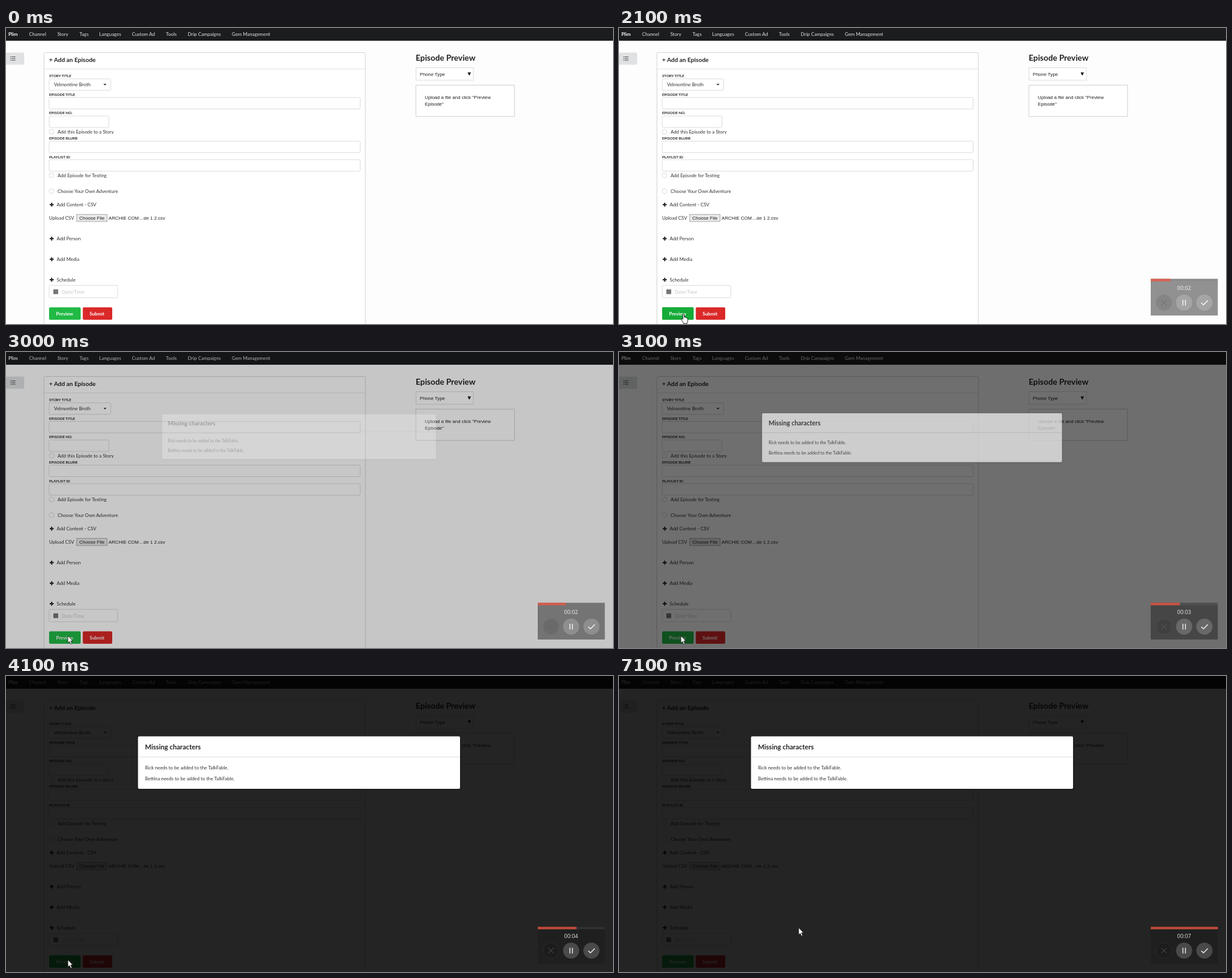
Animation of 1000x488 px, one loop 7.2 s. Source, as an HTML page:

```html
<!DOCTYPE html>
<html lang="en">
<head>
<meta charset="utf-8">
<title>Add an Episode</title>
<style>
  html, body { margin: 0; width: 100%; height: 100%; overflow: hidden; background: #fdfdfd; }
  svg { display: block; width: 100%; height: 100%; }
  text { font: 7.82px Lato, sans-serif; fill: #333; white-space: pre; }
  .arial text { font: 7.8px "Liberation Sans", Arial, sans-serif; fill: #222; }
  .nav text { fill: #e6e6e6; }
  .labels text { font-size: 6.15px; font-weight: 700; fill: #222; }
  .bold, .buttons text { font-weight: 700; }
  .nav .bold, .buttons text { fill: #fff; }
  .h2 { font-size: 13.4px; font-weight: 700; fill: #222; }
  .h3 { font-size: 10px; font-weight: 700; fill: #222; }
  .modal-title { font-size: 11.1px; font-weight: 700; fill: #222; }
  .box { fill: #fff; stroke: #dcdcdd; }
  .clock { font: 9px "Open Sans", sans-serif; fill: #fff; fill-opacity: .88; text-anchor: middle; }

  .hover, .dim, .modal, .recorder, .bar, .arrow, .hand, .move { animation: 7.2s linear infinite; }
  .dim { animation-name: fade; }
  .modal { animation-name: fade, grow; transform-origin: 482.75px 122px; }
  .recorder { animation-name: appear; }
  .bar { animation-name: progress; transform-origin: 876px 0; }
  .hand, .hover { animation-name: over-button; }
  .arrow { animation-name: arrow-on; }
  .move { animation-name: travel; }

  @keyframes fade {
    0%, 40.417% { opacity: 0; animation-timing-function: ease; }
    47.361%, 100% { opacity: 1; }
  }
  @keyframes grow {
    0%, 40.417% { transform: scale(.8); animation-timing-function: ease; }
    47.361%, 100% { transform: none; }
  }
  @keyframes appear {
    0% { opacity: 0; animation-timing-function: step-end; }
    1.2%, 100% { opacity: 1; }
  }
  @keyframes progress {
    0% { transform: scaleX(0); }
    98.6%, 100% { transform: scaleX(1); }
  }
  @keyframes over-button {
    0% { opacity: 0; animation-timing-function: step-end; }
    12.4% { opacity: 1; animation-timing-function: step-end; }
    40.417%, 100% { opacity: 0; }
  }
  @keyframes arrow-on {
    0% { opacity: 0; animation-timing-function: step-end; }
    1.2% { opacity: 1; animation-timing-function: step-end; }
    12.4% { opacity: 0; animation-timing-function: step-end; }
    40.417%, 100% { opacity: 1; }
  }
  @keyframes travel {
    0%, 3% { transform: translate(190px, 400px); animation-timing-function: ease-in-out; }
    11%, 68.06% { transform: translate(102px, 468px); animation-timing-function: ease-in-out; }
    76.4%, 100% { transform: translate(296px, 415px); }
  }
</style>
</head>
<body>
<svg viewBox="0 0 1000 488" preserveAspectRatio="none">
  <defs>
    <path id="plus" d="M-3.3 0H3.3M0 -3.3V3.3" stroke="#222" stroke-width="2"/>
    <circle id="radio" r="4" class="box"/>
    <filter id="shadow" x="-5%" y="-20%" width="110%" height="140%">
      <feDropShadow dx="0" dy="1" stdDeviation="1.5" flood-opacity=".25"/>
    </filter>
  </defs>
  <rect width="1000" height="488" fill="#fdfdfd"/>

  <rect width="1000" height="21" fill="#1b1c1d"/>
  <g class="nav">
    <text x="4" y="12.8" class="bold">Plim</text>
    <text x="38" y="12.8">Channel</text>
    <text x="84.5" y="12.8">Story</text>
    <text x="121" y="12.8">Tags</text>
    <text x="153.5" y="12.8">Languages</text>
    <text x="207.5" y="12.8">Custom Ad</text>
    <text x="263.5" y="12.8">Tools</text>
    <text x="299.5" y="12.8">Drip Campaigns</text>
    <text x="372" y="12.8">Gem Management</text>
  </g>

  <path d="M0 40.5H27.5Q30 40.5 30 43V58Q30 60.5 27.5 60.5H0Z" fill="#e0e1e2"/>
  <path d="M7 47.5H8.5M7 50.3H8.5M7 53.1H8.5M9.3 47.5H15.5M9.3 50.3H15.5M9.3 53.1H15.5" stroke="#555"/>

  <rect x="62.5" y="40.5" width="529.5" height="470" rx="2" class="box" style="stroke:#d4d4d5"/>
  <path d="M63 67.5H591.5" stroke="#e2e2e3"/>
  <text x="71" y="56" class="h3">+ Add an Episode</text>

  <g class="labels">
    <text x="71" y="80.7">STORY TITLE</text>
    <text x="71" y="111.5">EPISODE TITLE</text>
    <text x="71" y="142.3">EPISODE NO.</text>
    <text x="71" y="183.8">EPISODE BLURB</text>
    <text x="71" y="214.5">PLAYLIST ID</text>
  </g>
  <g class="box">
    <rect x="71" y="83.8" width="101.5" height="19" rx="2"/>
    <rect x="71" y="114.5" width="512.5" height="19" rx="2"/>
    <rect x="71" y="145" width="98.5" height="19" rx="2"/>
    <rect x="71" y="186.5" width="512.5" height="19" rx="2"/>
    <rect x="71" y="217" width="512.5" height="19" rx="2"/>
    <rect x="71" y="424.3" width="113" height="20.5" rx="2"/>
  </g>
  <text x="79" y="96">Velmontine Broth</text>
  <path d="M160.5 92H165.5L163 94.7Z" fill="#333"/>

  <use href="#radio" x="75" y="171"/>
  <use href="#radio" x="75" y="243"/>
  <use href="#radio" x="75" y="269"/>
  <text x="85" y="173.8">Add this Episode to a Story</text>
  <text x="85" y="245.8">Add Episode for Testing</text>
  <text x="85" y="271.8">Choose Your Own Adventure</text>

  <use href="#plus" x="75.3" y="291.3"/>
  <use href="#plus" x="75.3" y="347.3"/>
  <use href="#plus" x="75.3" y="381.3"/>
  <use href="#plus" x="75.3" y="415"/>
  <text x="83.5" y="294">Add Content - CSV</text>
  <text x="83.5" y="350">Add Person</text>
  <text x="83.5" y="384">Add Media</text>
  <text x="83.5" y="417.8">Schedule</text>

  <text x="71" y="316">Upload CSV</text>
  <rect x="116.5" y="307.3" width="50" height="11.7" fill="#e9e9e9" stroke="#aaa"/>
  <g class="arial">
    <text x="120.7" y="316">Choose File</text>
    <text x="169" y="316">ARCHIE COM…de 1 2.csv</text>
  </g>

  <path d="M78.5 432.2H85.5V438.2H78.5ZM78.5 431.5V432H85.5V431.5ZM80 430.5V432M84 430.5V432" fill="#777" stroke="#777"/>
  <text x="92" y="437.5" style="fill:#c4c4c4">Date/Time</text>

  <g class="buttons">
    <rect x="71" y="460.5" width="52" height="20.5" rx="2" fill="#21ba45"/>
    <rect x="71" y="460.5" width="52" height="20.5" rx="2" fill="#16ab39" class="hover"/>
    <rect x="126.5" y="460.5" width="48.5" height="20.5" rx="2" fill="#db2828"/>
    <text x="82.5" y="473.5">Preview</text>
    <text x="137.7" y="473.5">Submit</text>
  </g>

  <text x="675" y="53.8" class="h2">Episode Preview</text>
  <rect x="675.5" y="65.5" width="94.5" height="20.5" class="box"/>
  <path d="M760.5 73.3H766L763.2 78.7Z" fill="#111"/>
  <rect x="675.3" y="94.3" width="162.4" height="51.4" class="box" stroke-width="1.4"/>
  <g class="arial">
    <text x="681.7" y="78.6">Phone Type</text>
    <text x="690" y="116.8">Upload a file and click "Preview</text>
    <text x="690" y="127.6">Episode"</text>
  </g>

  <rect class="dim" width="1000" height="488" fill="#000" fill-opacity=".86"/>

  <g class="modal">
    <rect x="217.5" y="99.5" width="530.5" height="86.5" rx="2" fill="#fff" filter="url(#shadow)"/>
    <path d="M217.5 133.5H748" stroke="#dedede"/>
    <text x="229" y="120.7" class="modal-title">Missing characters</text>
    <text x="229" y="153.8">Rick needs to be added to the TalkFable.</text>
    <text x="229" y="172.2">Bettina needs to be added to the TalkFable.</text>
  </g>

  <g class="recorder">
    <rect x="876" y="413.5" width="110.5" height="60.5" fill="#1c1c1c" fill-opacity=".48"/>
    <rect x="876" y="413.5" width="110.5" height="4" fill="#777" fill-opacity=".2"/>
    <rect class="bar" x="876" y="413.5" width="110.5" height="4" fill="#f5553c" fill-opacity=".75"/>
    <text x="931" y="432.3" class="clock" id="clock">00:00</text>
    <circle cx="897.8" cy="452.7" r="13" fill="#000" fill-opacity=".08" stroke="#777" stroke-opacity=".15"/>
    <g fill="#fff" fill-opacity=".19">
      <circle cx="931" cy="452.7" r="13.3"/>
      <circle cx="964.5" cy="452.7" r="13.3"/>
    </g>
    <path d="M893.3 448.2L902.3 457.2M902.3 448.2L893.3 457.2" stroke="#606060" stroke-opacity=".75"/>
    <path d="M929 448V457.4M933.2 448V457.4" stroke="#fff" stroke-opacity=".85" stroke-width="1.5"/>
    <path d="M959.3 453L962.8 456.5L970 449.2" fill="none" stroke="#fff" stroke-opacity=".9" stroke-width="1.5"/>
  </g>

  <path class="hand" d="M105.2 480V473Q105.2 471.6 106.4 471.6T107.6 473V477Q109.6 476.2 110 477.6Q111.4 477 111.8 478.4Q113.2 478 113.2 479.6V483Q113.2 485 112 486V487.6H106.4V486.4L103 481.6Q102.4 480 103.5 479.4Q104.5 479.2 105.2 480.4Z"
        fill="#fff" stroke="#111" stroke-width=".9" stroke-linejoin="round"/>
  <g class="move">
    <path class="arrow" d="M0 0V11.5L2.6 9.2L4.5 13.6L6.5 12.7L4.6 8.4H8Z" fill="#fff" stroke="#111" stroke-width=".7"/>
  </g>
</svg>
<script>
  const clock = document.getElementById('clock');
  const progress = document.querySelector('.bar').getAnimations()[0];

  // The counter reads the same clock as the keyframes.
  function tick() {
    const time = (progress.currentTime || 0) % 7200;
    const seconds = Math.max(0, Math.floor((time - 60) / 1000));
    clock.textContent = '00:0' + seconds;
    requestAnimationFrame(tick);
  }
  tick();
</script>
</body>
</html>
```
